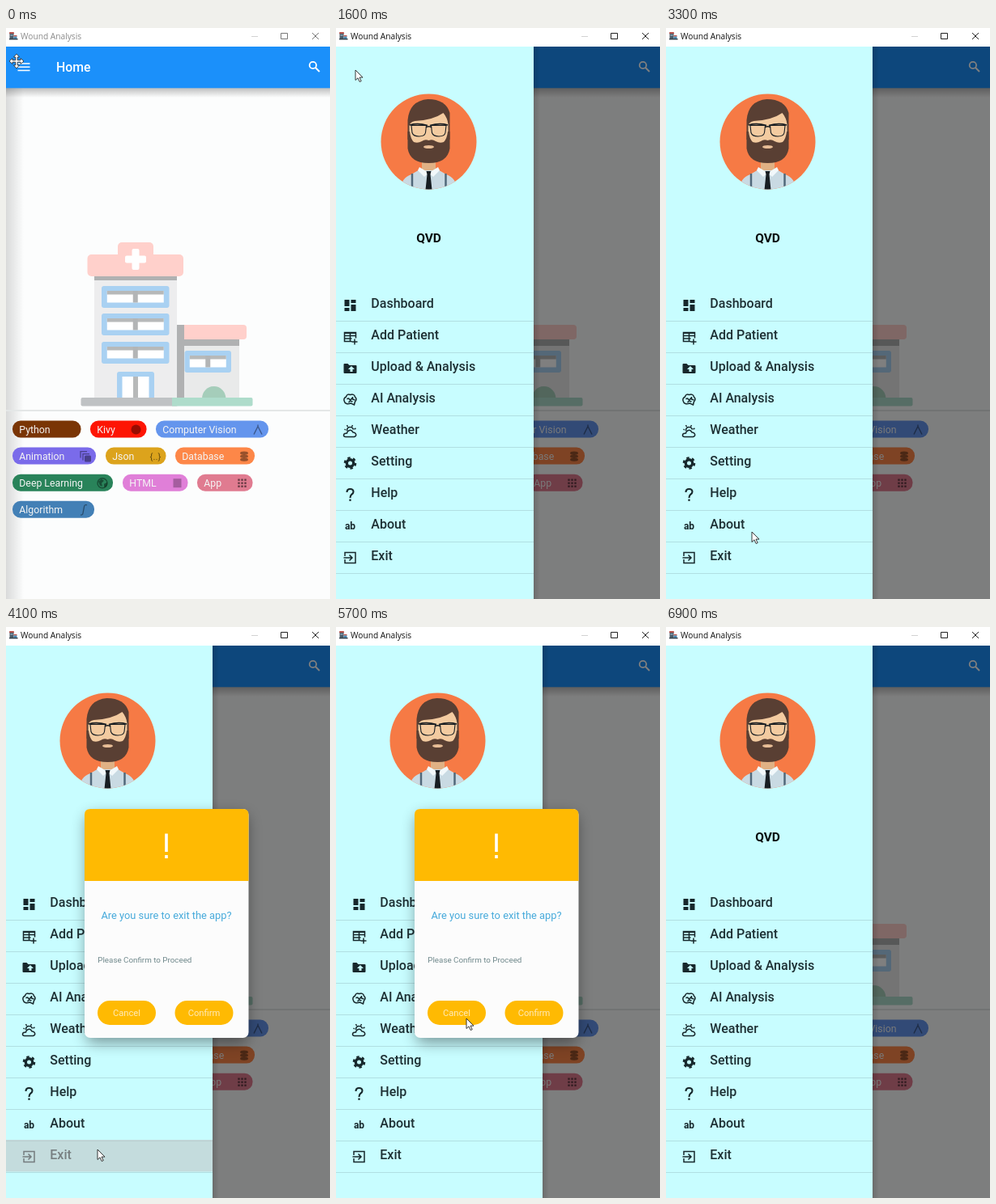
These frames come from a looping animation (400 px wide and 706 px high, 7000 ms). An HTML page:

```html
<!DOCTYPE html>
<html lang="en">
<head>
<meta charset="utf-8">
<title>Wound Analysis</title>
<style>
html, body { margin: 0; width: 100%; height: 100%; overflow: hidden; background: #fcfdfd; }
svg { display: block; width: 400px; height: 706px; font-family: Roboto, sans-serif; }
.ui { font-family: "Open Sans", "Noto Sans", sans-serif; }
</style>
</head>
<body>
<svg id="stage" viewBox="0 0 400 706" xmlns="http://www.w3.org/2000/svg"></svg>
<script>
const LOOP = 7000, STEP = 100, DRAWER = 255;
const rect = (x, y, w, h, fill, r = 0, more = '') =>
  `<rect x="${x}" y="${y}" width="${w}" height="${h}" rx="${r}" fill="${fill}" ${more}/>`;
const text = (x, y, size, fill, str, more = '') =>
  `<text x="${x}" y="${y}" font-size="${size}" fill="${fill}" ${more}>${str}</text>`;
const line = (d, stroke, w = 1, more = '') =>
  `<path d="${d}" fill="none" stroke="${stroke}" stroke-width="${w}" ${more}/>`;
const shape = (d, fill, more = '') => `<path d="${d}" fill="${fill}" ${more}/>`;
const disc = (x, y, r, fill, more = '') => `<circle cx="${x}" cy="${y}" r="${r}" fill="${fill}" ${more}/>`;
const at = (x, y, inner) => `<g transform="translate(${x} ${y})">${inner}</g>`;
const fade = (id, pos, color, from) =>
  `<linearGradient id="${id}" ${pos}><stop stop-color="${color}" stop-opacity="${from}"/><stop offset="1" stop-color="${color}" stop-opacity="0"/></linearGradient>`;

const defs = `<defs>
  ${fade('down', 'x2="0" y2="1"', '#000', .25)}
  ${fade('side', 'x2="1" y2="0"', '#000', .14)}
  ${fade('edge', 'x2="1" y2="0"', '#000', .14)}
  <filter id="blur" x="-20%" y="-20%" width="140%" height="140%"><feGaussianBlur stdDeviation="9"/></filter>
  <clipPath id="face"><circle cx="125.5" cy="140.5" r="59"/></clipPath>
  <clipPath id="body"><rect y="23" width="400" height="683"/></clipPath>
  <clipPath id="row"><rect y="634" width="255" height="39.5"/></clipPath>
</defs>`;

function titleBar() {
  return rect(0, 0, 400, 23, '#fff') +
    rect(4, 5, 6, 2.5, '#b8564f', 1) + rect(4.5, 7, 5, 7, '#4d5c68') + rect(5.5, 8.5, 3, 1, '#a8d0ec') +
    rect(9.5, 9, 4, 1.5, '#b8564f') + rect(9.5, 10.5, 4, 3.5, '#4a87b0') + rect(4, 13, 10.5, 1.5, '#36454f') +
    text(18, 13.7, 10.2, '#111', 'Wound Analysis', 'id="title" class="ui"') +
    line('M303 10.5h8', '#d2d2d2') +
    `<g id="controls" stroke="#222" fill="none"><path d="M339.5 6.5h8v7h-8z"/><path d="M378 6l8 8m0-8l-8 8"/></g>`;
}

function windowPanes(x, y, w, paneW, gap) {
  const px = x + (w - 2 * paneW - gap) / 2;
  return rect(x, y, w, 27, '#a9d1f2', 3) + rect(px, y + 6, 2 * paneW + gap, 14.5, '#fff') +
    rect(px, y + 6, 2 * paneW + gap, 4.5, '#b7b9b9') + rect(px + paneW, y + 6, gap, 14.5, '#b3b5b6');
}

function hospital() {
  const pink = '#ffd0cb', grey = '#b0b1b2';
  return rect(109, 305, 102, 153, '#ededee') + rect(109, 306, 102, 6, grey) +
    rect(138, 265, 44, 25, pink, 5) + rect(100.5, 280, 118.5, 27, pink, 5) +
    rect(155.5, 273, 9, 26, '#fff', 2) + rect(147, 281.5, 26, 9, '#fff', 2) +
    [319, 353, 388].map(y => windowPanes(118, y, 83.5, 32, 6)).join('') +
    shape('M137 458v-30q0-3 3-3h40q3 0 3 3v30z', '#a9d1f2') +
    rect(143.5, 431, 33, 27, '#fff') + rect(157, 431, 6, 27, '#b7b9b9') +
    rect(219, 384, 69, 74, '#e9eaea') + rect(219, 384, 69, 9, grey) +
    rect(211, 367, 9, 91, grey) + shape('M220 367h73q4 0 4 4v10q0 4-4 4h-73z', pink) +
    windowPanes(220.5, 399, 57.5, 19.5, 6) +
    shape('M242 458a14.7 15 0 0 1 29.4 0z', '#a5cdba') +
    rect(92.5, 457, 120, 10.5, '#bfc2c4', 2) +
    shape('M205 457h97.500q2 0 2 2v6.500q0 2-2 2h-97.500z', '#aedccb');
}

const ink = '#0006';
const chipIcons = {
  none: '',
  ball: disc(0, 0, 6, ink),
  compass: line('M-5 6L0-4 5 6M0-6v2', ink, 1.4),
  layers: line('M-6 2v-8h8M-3 5v-8h8', ink, 1.3) + rect(-1, -1, 8, 8, ink, 1.5),
  json: text(0, 4, 11.5, '#0008', '{..}', 'text-anchor="middle" textLength-adjust="none"'.split(' ')[0]),
  disks: [-4, 0, 4].map(y => `<ellipse cy="${y}" rx="5" ry="2.200" fill="${ink}"/>`).join(''),
  globe: disc(0, 0, 6, 'none', `stroke="${ink}" stroke-width="1.400"`) + shape('M-5-2l4-3 3 2-3 3 1 4-3-1zM2 1l4-2-1 5-3 1z', ink),
  block: rect(-5, -5.5, 10, 11, '#0004'),
  dots: [-4, 0, 4].map(y => [-4, 0, 4].map(x => rect(x - 1.2, y - 1.2, 2.4, 2.4, '#0008')).join('')).join(''),
  integral: line('M4-6q-3-1-3.500 2l-1.500 8q-.5 3-3 2', ink, 1.3)
};
chipIcons.json = text(0, 4, 11.5, '#0008', '{..}', 'text-anchor="middle"');
const chips = [
  ['Python', 8, 0, 84.5, '#7a3505', 'none'], ['Kivy', 104, 0, 69.5, '#fd1504', 'ball'],
  ['Computer Vision', 185, 0, 139, '#6495ed', 'compass'],
  ['Animation', 8, 1, 103, '#7a6bea', 'layers'], ['Json', 123, 1, 74.5, '#dca31c', 'json'],
  ['Database', 209, 1, 98, '#fd8748', 'disks'],
  ['Deep Learning', 8, 2, 124, '#29835a', 'globe'], ['HTML', 144, 2, 80.5, '#e07fd8', 'block'],
  ['App', 236, 2, 68.5, '#e07b90', 'dots'], ['Algorithm', 8, 3, 101, '#4380b6', 'integral']
];
const chip = ([name, x, row, w, fill, icon]) => at(x, 485.5 + 33.1 * row,
  rect(0, 0, w, 21, fill, 10) + text(8.3, 15, 12.3, '#f4f4f4', name) + at(w - 13, 11, chipIcons[icon]));

function home() {
  return rect(0, 23, 400, 683, '#fcfdfd') + rect(0, 74, 22, 632, 'url(#side)') +
    rect(0, 74, 400, 12, 'url(#down)') + rect(0, 23, 400, 51.3, '#1b90fa') +
    line('M14.500 44h15M14.500 48.300h15M14.500 52.600h15', '#fff', 1.5) +
    text(62, 54.2, 15.8, '#fff', 'Home', 'font-weight="500"') +
    disc(378.9, 46, 4.2, 'none', 'stroke="#fff" stroke-width="1.800"') + line('M382 49l5 5', '#fff', 2) +
    hospital() + rect(0, 472, 400, 2, '#e4e7e7') + chips.map(chip).join('');
}

function hint() {
  return disc(22, 48.5, 36, '#fdfefe', 'id="ring"') + disc(22, 48.5, 19.5, '#1b90fa', 'id="core"') +
    line('M14.500 44h15M14.500 48.300h15M14.500 52.600h15', '#fff', 1.5) +
    text(153.5, 55.5, 11.8, '#fff', 'This is the MENU button', 'font-weight="700" text-anchor="end"') +
    text(25, 74.5, 12, '#fff', 'Press the button to activate', 'opacity=".8"') +
    text(25, 89, 12, '#e6e8e9', 'navigation drawer');
}

function avatar() {
  const hair = '#593f33', skin = '#f3cba0', dark = '#171d22';
  return disc(125.5, 140.5, 59, '#f67a45') + `<g clip-path="url(#face)">` +
    shape('M90 200q2-15 14-19l12-7h19l12 7q12 4 14 19z', '#c9dae3') +
    line('M105 180v20M146.500 180v20', '#50687a', 2.5) +
    rect(117, 158, 17, 18, '#e0b184') +
    shape('M114 172l11.500 7 11.500-7 2 4-8 8-5.500-5-5.500 5-8-8z', '#f2f8fb') +
    shape('M122.500 177h6l-1 4 2 19h-8l2-19z', dark) + '</g>' +
    shape('M99.500 138v-24q2-24 25-26 22 0 27 17v33z', hair) +
    shape('M101.500 146v-25q1-5 7-6 22-1 35-10 5 6 6 14v27z', skin) +
    shape('M99.500 128h2.500q1 9 5 13 5 2 10-1 4-3 8.500-1 4.500-2 8.500 1 5 3 10 1 4-4 5-13h2.500v21q-3 18-26 18t-26-18z', hair) +
    `<ellipse cx="125.500" cy="147" rx="6.500" ry="2" fill="#e8bd96"/>` +
    line('M102 120q10-3 22 .5M127 120.500q12-3.500 22-.5', dark, 1.8) +
    line('M104 120.500h18.500l-1 9q-1 4.500-8 4.500t-8.500-4.500zM128.500 120.500h18.500l-1 9q-1 4.500-8 4.500t-8.500-4.500z', dark, 1.1) +
    line('M122 123q3.500-2.500 7 0', dark, 1.3);
}

const dark = '#17282c';
const outline = d => line(d, dark, 1.5);
const menu = [
  ['Dashboard', shape('M-7-7h6v8h-6zM-7 3h6v4h-6zM1-7h6v4h-6zM1-1h6v8h-6z', dark)],
  ['Add Patient', outline('M2 5.500h-9v-11h14v7M-7-1.500h14M-7 2h9M0-5v10M5.500 2.500v7M2 6h7') + rect(-7, -6, 14, 2, dark)],
  ['Upload &amp; Analysis', shape('M-8-5q0-1 1-1h4l2 2h8q1 0 1 1v8q0 1-1 1H-7q-1 0-1-1z', dark) +
    shape('M0 4V1h-2.500L1.500-3 5.500 1H3v3z', '#c8fdff')],
  ['AI Analysis', outline('M-7 2q-2-4 2-6 1-4 5-2.500 5-1.500 6 2.500 3 3 0 6l-1 4-4-2q-7 2-8-2zM-4-1q2-2 3 0t4-2M-2 3l2-2 3 1M3-4v3l3 1')],
  ['Weather', outline('M-5.500 6.500h10.500q3-1 2-3.500t-3.500-2q-2-4-5.500-2-2 1-2 3-4 0-4 2.500 0 2 2.500 2zM-4-1q0-5 4.500-4.500 2.500 0 3.500 3M-7-3l1.500 1M-4-8l1 2M3-8l-1 2M7-4l-2 1')],
  ['Setting', disc(0, 0, 4.2, 'none', `stroke="${dark}" stroke-width="3.400"`) +
    disc(0, 0, 6.6, 'none', `stroke="${dark}" stroke-width="2.400" stroke-dasharray="3.456"`)],
  ['Help', line('M-4-3q0-4 4-4t4 3.500q0 2-2.500 3.500Q0 1.500 0 4', dark, 2.1) + rect(-1.1, 5.5, 2.2, 2.4, dark)],
  ['About', text(0, 4.3, 12, dark, 'ab', 'text-anchor="middle" font-weight="600"')],
  ['Exit', outline('M-6.500-2v-4.500h13v13h-13V2M-8 0h10M-1-3.500L2.500 0-1 3.500')]
];

function drawer() {
  return rect(DRAWER, 23, 8, 683, 'url(#edge)') + rect(0, 23, DRAWER, 683, '#c8fdff') + avatar() +
    text(125.5, 264.5, 15.5, '#080c0c', 'QVD', 'font-weight="700" text-anchor="middle"') +
    menu.map(([name, icon], i) => at(0, 39 * i,
      at(28.5, 343, icon) + text(54.3, 346.3, 16, '#1d2f33', name, 'font-weight="500"') +
      line('M0 362.500h255', '#b1dfe2'))).join('') +
    `<g clip-path="url(#row)">${disc(113, 650, 0, '#c1c1c1', 'id="ripple" opacity=".55"')}</g>`;
}

function dialog() {
  const amber = '#ffba02';
  const button = (x, name) => rect(x, 462, 72, 30, amber, 15) +
    text(x + 36, 480.5, 11.2, '#ffeab8', name, 'text-anchor="middle"');
  return rect(99, 232, 199, 282, '#000', 8, 'opacity=".4" filter="url(#blur)"') +
    rect(97, 225, 202.5, 283, '#fcfcfc', 7) +
    shape('M97 314v-82q0-7 7-7h188.500q7 0 7 7v82z', amber) +
    rect(196.2, 255.5, 3.6, 22.5, '#fff') + rect(196.2, 282, 3.6, 4, '#fff') +
    text(198, 361, 12.85, '#46aadb', 'Are you sure to exit the app?', 'text-anchor="middle"') +
    text(113.3, 415, 9.8, '#70898c', 'Please Confirm to Proceed') +
    button(113, 'Cancel') + button(208.5, 'Confirm');
}

const arrow = '<path d="M0 0v12.500l3-2.700 2.200 4.700 2-.9-2.200-4.500h4z" fill="#fff" stroke="#222" stroke-width=".9"/>';
const spear = 'M0-9l3.500 4H1.200v3.800H5v-2.300L9 0 5 3.500V1.200H1.200V5h2.300L0 9l-3.500-4h2.300V1.200H-5v2.300L-9 0l4-3.500v2.300h3.800V-5h-2.300z';

const group = (id, inner) => `<g id="${id}">${inner}</g>`;
document.getElementById('stage').innerHTML = defs +
  `<g clip-path="url(#body)">` + home() + group('hint', hint()) +
  rect(0, 23, 400, 683, '#000', 0, 'id="scrim"') + group('drawer', drawer()) + group('dialog', dialog()) + '</g>' +
  titleBar() + group('arrow', arrow) + group('move', `<path d="${spear}" fill="#fff" stroke="#222" stroke-width=".8"/>`);

const el = id => document.getElementById(id);
const set = (id, attrs) => Object.entries(attrs).forEach(([k, v]) => el(id).setAttribute(k, v));
const show = (id, on) => set(id, { display: on ? 'inline' : 'none' });
const ramp = (t, a, b) => Math.min(1, Math.max(0, (t - a) / (b - a)));
const outCubic = p => 1 - (1 - p) ** 3;

// time, x, y of the pointer tip
const track = [
  [0, 13, 41], [300, 13, 41], [900, 23, 52], [1500, 23, 52], [1600, 24, 52], [2000, 40, 120], [2800, 98, 560],
  [3300, 106, 623], [3500, 110, 680], [3700, 113, 646], [4600, 113, 646], [5400, 161, 484],
  [5800, 161, 484], [6000, 118, 680], [6100, 112, 656], [7000, 112, 656]
];
function pointer(t) {
  const i = track.findIndex(k => k[0] > t);
  const [t0, x0, y0] = track[i - 1], [t1, x1, y1] = track[i];
  const p = ramp(t, t0, t1), s = p * p * (3 - 2 * p);
  return `translate(${x0 + (x1 - x0) * s} ${y0 + (y1 - y0) * s})`;
}

function draw(t) {
  const active = t >= 300;
  set('title', { fill: active ? '#111' : '#8a8a8a' });
  set('controls', { stroke: active ? '#222' : '#777' });

  const open = outCubic(ramp(t, 1470, 1670));
  show('hint', t >= 1400 && t < 1700);
  set('ring', { r: 36 + 100 * ramp(t, 1400, 1500) });
  set('core', { r: 19.5 + 16 * ramp(t, 1400, 1500) });
  set('scrim', { opacity: .5 * ramp(t, 1470, 1600) });
  show('drawer', open > 0);
  set('drawer', { transform: `translate(${Math.round(DRAWER * (open - 1))} 0)` });

  show('ripple', t >= 3800 && t < 4400);
  set('ripple', { r: 60 + 200 * ramp(t, 3800, 4000) });
  const shown = ramp(t, 3800, 4000) * (1 - ramp(t, 5700, 5900));
  show('dialog', shown > 0);
  set('dialog', { opacity: shown });

  show('move', !active);
  show('arrow', active && t < 6900);
  set('move', { transform: pointer(t) });
  set('arrow', { transform: pointer(t) });
}

function tick() {
  draw(Math.floor(performance.now() % LOOP / STEP) * STEP);
  requestAnimationFrame(tick);
}
tick();
</script>
</body>
</html>
```
